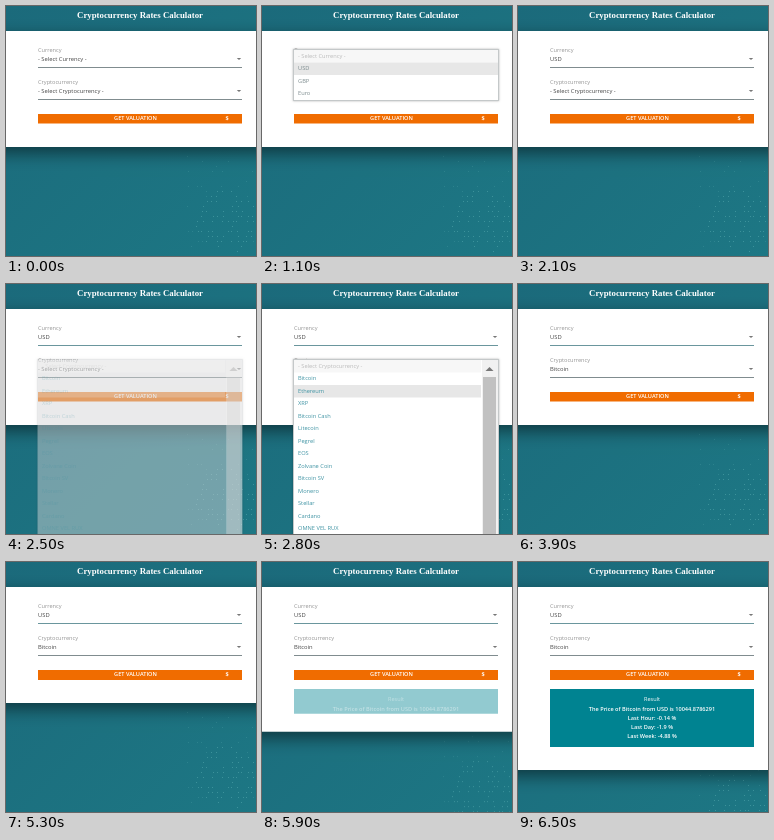
These frames come from a looping animation (250 by 250 pixels, 8000 ms). An HTML page with a canvas:

```html
<!DOCTYPE html>
<html lang="en">
<head>
<meta charset="utf-8">
<title>Rates calculator</title>
<style>
  html, body { margin: 0; width: 100%; height: 100%; overflow: hidden; }
  canvas { display: block; }
</style>
</head>
<body>
<canvas id="stage" width="250" height="250"></canvas>
<script>
const ctx = document.getElementById('stage').getContext('2d');
const LOOP = 8000, STEP = 100, PITCH = 12.5;
const TITLE_FONT = 'bold 8.8px "Liberation Serif", serif';
const currencies = ['- Select Currency -', 'USD', 'GBP', 'Euro'];
const coins = ['- Select Cryptocurrency -', 'Bitcoin', 'Ethereum', 'XRP', 'Bitcoin Cash', 'Litecoin',
  'Pegrel', 'EOS', 'Zolvane Coin', 'Bitcoin SV', 'Monero', 'Stellar', 'Cardano', 'OMNE VEL RUX',
  'Yuqob Token', 'TRON', 'Dash'];
const results = ['The Price of Bitcoin from USD is 10044.8786291',
  'Last Hour: -0.14 %', 'Last Day: -1.9 %', 'Last Week: -4.88 %'];

const clamp = x => Math.max(0, Math.min(1, x));
const swing = x => (1 - Math.cos(Math.PI * x)) / 2;
const sans = (size, weight = 400) => `${weight} ${size}px "Open Sans", sans-serif`;

function rect(color, x, y, w, h) {
  ctx.fillStyle = color;
  ctx.fillRect(x, y, w, h);
}

function text(str, x, y, color, font = sans(5.8), align = 'left') {
  ctx.font = font;
  ctx.fillStyle = color;
  ctx.textAlign = align;
  ctx.fillText(str, x, y);
}

function triangle(color, x, y, w, h) {
  ctx.fillStyle = color;
  ctx.beginPath();
  ctx.moveTo(x - w, y - h);
  ctx.lineTo(x + w, y - h);
  ctx.lineTo(x, y + h);
  ctx.fill();
}

function background(shift) {
  const teal = ctx.createLinearGradient(0, 0, 250, 250);
  teal.addColorStop(0, '#1b6a7b');
  teal.addColorStop(1, '#1d7784');
  rect(teal, 0, 0, 250, 250);
  let seed = 7;
  for (let y = 150; y < 248; y += 5) {
    for (let x = 180; x < 246; x += 5) {
      seed = seed * 16807 % 2147483647;
      const near = Math.hypot(x - 220, y - 215) < 32;
      if (seed / 2147483647 < (near ? 0.6 : 0.2)) {
        rect(`rgba(120,200,200,${near ? 0.35 : 0.18})`, x + seed % 3, y + shift, 1, 1);
      }
    }
  }
}

function card(bottom) {
  ctx.save();
  ctx.shadowColor = 'rgba(0,0,0,.5)';
  ctx.shadowBlur = 16;
  ctx.shadowOffsetY = 6;
  rect('#fff', -20, 25, 290, bottom - 25);
  ctx.restore();
}

function field(label, value, y, line) {
  text(label, 32, y + 2, '#949494', sans(5.6));
  text(value, 32, y + 11, '#444');
  rect(line, 32, y + 17, 204, 1);
  triangle('#777', 233, y + 9, 2.2, 1.1);
}

// A closing list shrinks at once towards its top left corner, then fades.
function dropdown(items, top, height, hover, color, t, open, opened, close, scrolls) {
  if (t < open || t >= close + 200) return;
  const closing = t >= close;
  ctx.save();
  ctx.globalAlpha = closing ? 0.72 * (1 - (t - close) / 200) : clamp((t - open + STEP) / (opened - open + STEP));
  ctx.translate(31, top);
  if (closing) ctx.scale(0.81, 0.81);
  ctx.save();
  ctx.shadowColor = 'rgba(0,0,0,.3)';
  ctx.shadowBlur = 2;
  rect('#c4c8c9', 0, 0, 206, height);
  ctx.restore();
  rect('#fff', 1, 1, 204, height - 2);
  const width = scrolls ? 187 : 204;
  rect('#f7f7f7', 1, 1, width, PITCH);
  if (hover) rect('#e7e7e7', 1, 1 + hover * PITCH, width, PITCH);
  items.forEach((item, i) => text(item, 5, 8.8 + i * PITCH, i ? color : '#bbb', sans(5.7)));
  if (scrolls) {
    rect('#f1f1f1', 189, 1, 16, height - 2);
    triangle('#777', 196.5, 10, 4, -2);
    rect('#c1c1c1', 190, 18, 13, height);
  }
  ctx.restore();
}

function resultPanel(p) {
  if (!p) return;
  ctx.save();
  ctx.globalAlpha = p;
  ctx.beginPath();
  ctx.rect(32, 127, 204, 58 * p);
  ctx.clip();
  rect('#008391', 32, 127, 204, 58);
  text('Result', 134, 139, '#fff', sans(5.6), 'center');
  results.forEach((line, i) => text(line, 134, 149 + i * 9, '#fff', sans(5.6, 600), 'center'));
  ctx.restore();
}

function draw(t) {
  const grow = swing(clamp((t - 5400) / 1100));
  background(33 * grow);
  card(141 + 67 * grow);
  text('Cryptocurrency Rates Calculator', 134, 12, '#fff', TITLE_FONT, 'center');
  field('Currency', currencies[t < 1900 ? 0 : 1], 44, t < 2500 ? '#808c8f' : '#6a969d');
  field('Cryptocurrency', coins[t < 3700 ? 0 : 1], 76, '#808c8f');
  rect('#f06c00', 32, 108, 204, t < 5300 ? 9.5 : 10);
  text('GET VALUATION', 129.5, 114.3, '#fff', sans(5.6, 600), 'center');
  text('$', 221, 114.3, '#fff', sans(5.6, 700), 'center');
  resultPanel(grow);

  const currencyHover = t < 1100 ? 0 : t >= 1300 && t < 1500 ? 2 : 1;
  dropdown(currencies, 43, 52, currencyHover, '#7b8a8d', t, 800, 900, 1900, false);
  const coinHover = t >= 3700 ? 0 : t < 3300 ? 2 : 1;
  dropdown(coins, 75, 300, coinHover, '#3f93a3', t, 2500, 2800, 3700, true);
}

function tick() {
  draw(Math.floor(performance.now() % LOOP / STEP) * STEP);
  requestAnimationFrame(tick);
}
tick();
</script>
</body>
</html>
```
